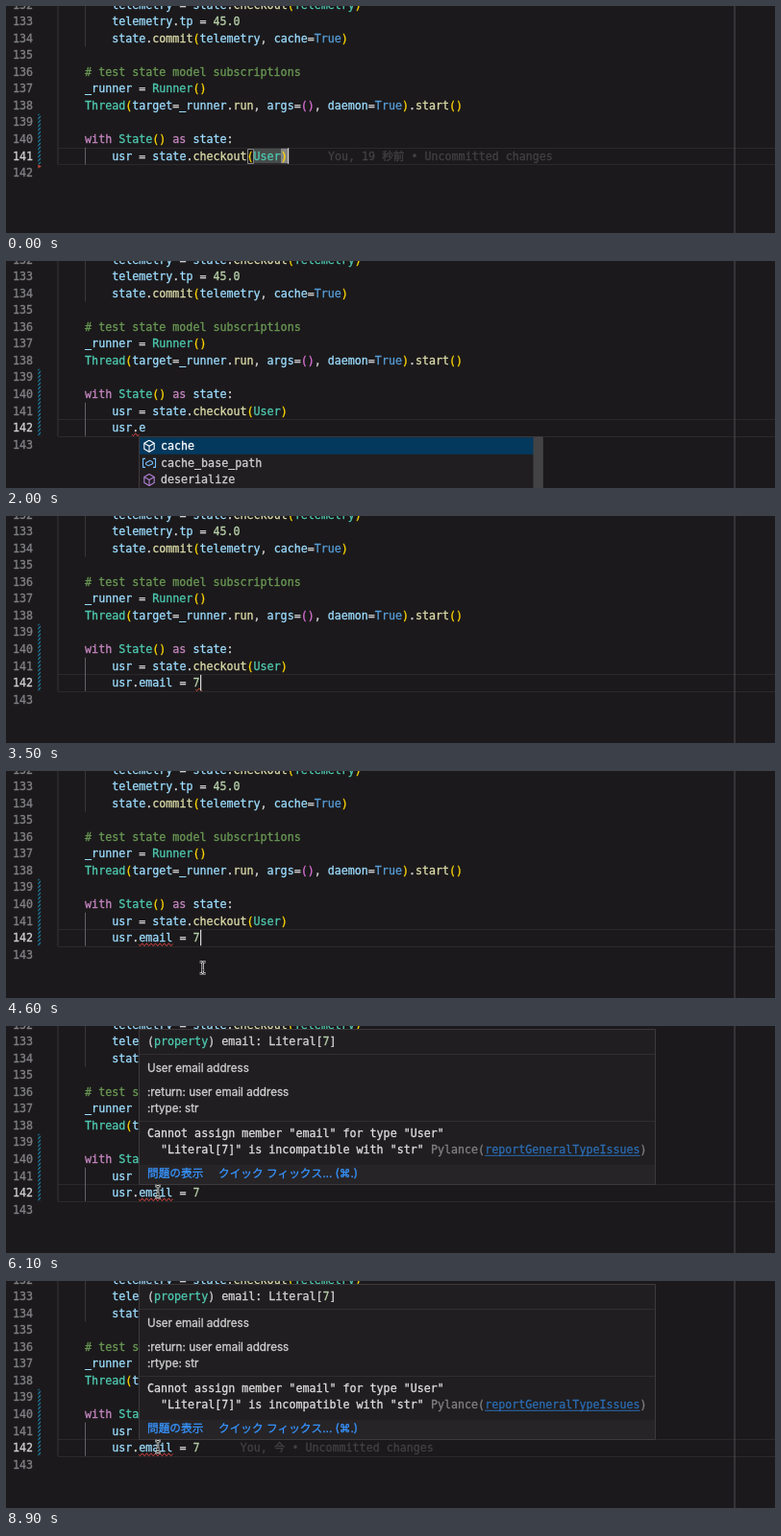
Animation of 800 by 237 pixels, one loop 9 s. Source, as an HTML page with a canvas:

```html
<!DOCTYPE html>
<html lang="en">
<head>
<meta charset="utf-8">
<title>Editor type check</title>
<style>
  html, body { margin: 0; width: 100%; height: 100%; overflow: hidden; background: #1b191b; }
  canvas { display: block; width: 800px; height: 237px; }
</style>
</head>
<body>
<canvas id="stage"></canvas>
<script>
const W = 800, H = 237, LOOP = 9000, STEP = 100;
const SIZE = 11.67, CH = SIZE * 0.602, ROW = 17.55, LEFT = 54;
const MONO = SIZE + 'px "DejaVu Sans Mono", "Noto Sans CJK JP", monospace';
const SANS = SIZE + 'px Inter, "Noto Sans CJK JP", "DejaVu Sans", sans-serif';
const BG = '#1b191b', PANEL = '#201e20', EDGE = '#3c3a3d', GHOST = '#424043';

// Token colours, keyed by the letter before "~"
const INK = {
  p: '#d4d4d4', v: '#9cdcfe', f: '#dcdcaa', c: '#4ec9b0', k: '#c586c0',
  t: '#569cd6', n: '#b5cea8', g: '#6a9955', y: '#ffd700', o: '#da70d6'
};
const parse = s => s.split('|').map(part => part.split('~'));

// line number, indent, tokens
const CODE = [
  [132, 8, 'v~telemetry|p~ = |v~state|p~.|f~checkout|y~(|c~Telemetry|y~)'],
  [133, 8, 'v~telemetry|p~.|v~tp|p~ = |n~45.0'],
  [134, 8, 'v~state|p~.|f~commit|y~(|v~telemetry|p~, |v~cache|p~=|t~True|y~)'],
  [136, 4, 'g~# test state model subscriptions'],
  [137, 4, 'v~_runner|p~ = |c~Runner|y~()'],
  [138, 4, 'c~Thread|y~(|v~target|p~=|v~_runner|p~.|f~run|p~, |v~args|p~=|o~()|p~, |v~daemon|p~=|t~True|y~)|p~.|f~start|y~()'],
  [140, 4, 'k~with|p~ |c~State|y~()|p~ |k~as|p~ |v~state|p~:'],
  [141, 8, 'v~usr|p~ = |v~state|p~.|f~checkout|y~(|c~User|y~)']
].map(([line, indent, src]) => ({ line, indent, tokens: parse(src) }));

const TYPED = parse('v~usr|p~.|v~email|p~ = |n~7');
const NEWLINE = 700;
const KEYS = [1200, 1200, 1300, 1400, 1500, 2200, 2300, 2400, 2500, 2700, 2900, 3100, 3400];
const HOVER_IN = 5300, BLAME_IN = 8500;

const canvas = document.getElementById('stage');
const ctx = canvas.getContext('2d');
const ratio = window.devicePixelRatio || 1;
canvas.width = W * ratio;
canvas.height = H * ratio;

const top_ = line => 165.3 - (142 - line) * ROW;
const col = n => LEFT + n * CH;
const within = (t, a, b) => t >= a && t < b;

function rect(x, y, w, h, color) {
  ctx.fillStyle = color;
  ctx.fillRect(x, y, w, h);
}

// A hairline outline gives the slightly heavy look of smoothed type
function text(s, x, y, color, font = MONO) {
  ctx.font = font;
  ctx.fillStyle = ctx.strokeStyle = color;
  ctx.lineWidth = 0.3;
  ctx.lineJoin = 'round';
  ctx.fillText(s, x, y);
  ctx.strokeText(s, x, y);
  return x + ctx.measureText(s).width;
}

function stroke(points, color, width = 1) {
  ctx.strokeStyle = color;
  ctx.lineWidth = width;
  ctx.beginPath();
  for (const [x, y] of points) ctx.lineTo(x, y);
  ctx.stroke();
}

function frame(x, y, w, h, color) {
  ctx.strokeStyle = color;
  ctx.lineWidth = 1;
  ctx.strokeRect(x + 0.5, y + 0.5, w - 1, h - 1);
}

function tokens(list, x, y, limit = Infinity) {
  for (const [kind, s] of list) {
    if (limit <= 0) break;
    x = text(s.slice(0, limit), x, y, INK[kind]);
    limit -= s.length;
  }
}

function squiggle(from, to, color = '#f14c4c') {
  const pts = [];
  for (let x = from; x <= to; x += 0.5) {
    pts.push([x, 181.3 + 1.2 * Math.sin((x - from) * Math.PI / 2.3)]);
  }
  stroke(pts, color, 1);
}

function gutter(bottom) {
  const y0 = top_(139);
  ctx.save();
  ctx.beginPath();
  ctx.rect(33.3, y0, 2.8, bottom - y0);
  ctx.clip();
  for (let y = y0; y < bottom + 5; y += 4) {
    stroke([[32.5, y + 2], [37, y - 2.5]], '#1b82a8', 1.2);
  }
  ctx.restore();
}

function editor(t) {
  const fresh = t < NEWLINE;
  const active = fresh ? 141 : 142;
  const y = top_(active);

  rect(LEFT, Math.round(y), W - LEFT, 1, '#2b292b');
  rect(LEFT, Math.round(y + ROW), W - LEFT, 1, '#2b292b');
  rect(53.5, 0, 1, top_(fresh ? 142 : 143), '#39373a');
  rect(82, 0, 1, top_(135), '#39373a');
  rect(82, top_(141), 1, (fresh ? 1 : 2) * ROW, '#626064');
  rect(757.5, 0, 1, H, '#525054');

  for (let n = 132; n <= (fresh ? 142 : 143); n++) {
    text(String(n), 7, top_(n) + 12.8, n === active ? '#d0d0d0' : '#808084');
  }
  gutter(top_(fresh ? 142 : 143));

  if (fresh) {
    ctx.fillStyle = '#b5473a';
    ctx.beginPath();
    ctx.moveTo(33.3, 165.5);
    ctx.lineTo(37, 167.5);
    ctx.lineTo(33.3, 169.5);
    ctx.fill();
    rect(col(29), y + 1, 4 * CH, ROW - 2, '#474b4a');
    frame(Math.round(col(28)), Math.round(y) + 1, 7, 16, '#888888');
    rect(col(33), y + 1, CH, ROW - 2, '#868686');
    text('You, 19 秒前 • Uncommitted changes', col(40), y + 12.8, GHOST);
  }
  for (const { line, indent, tokens: list } of CODE) {
    tokens(list, col(indent), top_(line) + 12.8);
  }
}

function cursor(t, count) {
  let x = col(34), y = top_(141), on = t < 100 || t >= 600;
  if (t >= NEWLINE) {
    const last = count ? KEYS[count - 1] : NEWLINE;
    x = col(8 + count);
    y = top_(142);
    on = (t - last) % 1000 < 500;
  }
  if (on) rect(Math.round(x), y + 0.5, 1.2, ROW - 1, '#d8d8d8');
}

function cube(x, y, color) {
  const r = 6, d = 5.2;
  stroke([[x, y - r], [x + d, y - 3], [x + d, y + 3], [x, y + r],
    [x - d, y + 3], [x - d, y - 3], [x, y - r]], color, 1.1);
  stroke([[x - d, y - 3], [x, y], [x + d, y - 3]], color, 1.1);
  stroke([[x, y], [x, y + r]], color, 1.1);
}

function variable(x, y, color) {
  for (const s of [-1, 1]) {
    stroke([[x + s * 4, y - 4.5], [x + s * 6.5, y - 4.5],
      [x + s * 6.5, y + 4.5], [x + s * 4, y + 4.5]], color, 1.1);
  }
  stroke([[x - 3.5, y], [x + 1, y - 2.5], [x + 3.5, y - 0.8],
    [x + 3.5, y + 1], [x - 1, y + 2.8], [x - 3.5, y + 1.3], [x - 3.5, y]], color, 1.1);
}

function suggestions(filtered) {
  const list = filtered
    ? [['email', cube, '#ffffff']]
    : [['cache', cube, '#ffffff'], ['cache_base_path', variable, '#75beff'], ['deserialize', cube, '#b180d7']];
  const h = filtered ? ROW + 2 : 60;
  rect(138, 183, 421, h, PANEL);
  rect(139, 184.3, filtered ? 419 : 410, ROW, '#04395e');
  list.forEach(([label, icon, color], i) => {
    const y = 184.3 + i * ROW;
    icon(149, y + 9, color);
    text(label, 161, y + 12.7, i ? '#d0d0d0' : '#ffffff');
  });
  if (!filtered) rect(548.5, 184, 10, H, '#434345');
  frame(138, 183, 421, h, EDGE);
}

function hover(alpha) {
  const link = '#3794ff', issue = '#2b6cb2', plain = '#d0d0d0', bright = '#dedede', dim = '#808082';
  ctx.globalAlpha = alpha;
  rect(138, 3, 538, 163, PANEL);
  rect(139, 145, 536, 20, '#262427');
  frame(138, 3, 538, 163, EDGE);
  for (const y of [29, 99]) rect(139, y, 536, 1, '#302e31');

  tokens(parse('p~(|c~property|p~) email: Literal[|n~7|p~]'), 147, 20.3);
  text('User email address', 147, 47.5, plain, SANS);
  text(':return: user email address', 147, 73, plain, SANS);
  text(':rtype: str', 147, 90.3, plain, SANS);
  text('Cannot assign member "email" for type "User"', 147, 115.5, bright);
  text('"Literal[7]" is incompatible with "str"', 147 + 2 * CH, 133, bright);

  const x = text('Pylance(', 442, 133, dim);
  const end = text('reportGeneralTypeIssues', x, 133, issue);
  rect(x, 134.8, end - x, 1, issue);
  text(')', end, 133, dim);

  text('問題の表示', 147, 157.9, link, SANS);
  text('クイック フィックス... (⌘.)', 221, 157.9, link, SANS);
  ctx.globalAlpha = 1;
}

function pointer(t) {
  const u = Math.min(1, Math.max(0, (t - 4400) / 500));
  const e = u * u * (3 - 2 * u);
  const x = 230 - 72 * e, y = 223 - 50 * e;
  const shape = [
    [[x - 3, y - 6], [x - 1, y - 6], [x, y - 5], [x + 1, y - 6], [x + 3, y - 6]],
    [[x, y - 5], [x, y + 5]],
    [[x - 3, y + 6], [x - 1, y + 6], [x, y + 5], [x + 1, y + 6], [x + 3, y + 6]],
    [[x - 1.5, y + 2.5], [x + 1.5, y + 2.5]]
  ];
  for (const line of shape) stroke(line, '#e8e8e8', 2.4);
  for (const line of shape) stroke(line, '#151515', 0.9);
}

function draw(t) {
  ctx.setTransform(ratio, 0, 0, ratio, 0, 0);
  rect(0, 0, W, H, BG);
  editor(t);

  const count = KEYS.filter(k => k <= t).length;
  tokens(TYPED, col(8), top_(142) + 12.8, count);
  if (within(t, 1700, 2400)) squiggle(col(11), col(12));
  if (within(t, 3200, 3700)) squiggle(197.5, 204, '#d8603c');
  if (t >= 4000) squiggle(col(12), col(17));
  if (t >= BLAME_IN) text('You, 今 • Uncommitted changes', col(27), top_(142) + 12.8, GHOST);
  cursor(t, count);

  if (within(t, 1400, 2700)) suggestions(t >= 2300);
  if (t >= HOVER_IN) hover(t < HOVER_IN + STEP ? 0.25 : 1);
  if (t >= 4300) pointer(t);
}

const start = performance.now();
function tick() {
  const t = (performance.now() - start) % LOOP;
  draw(Math.floor(t / STEP) * STEP);
  requestAnimationFrame(tick);
}
tick();
</script>
</body>
</html>
```
